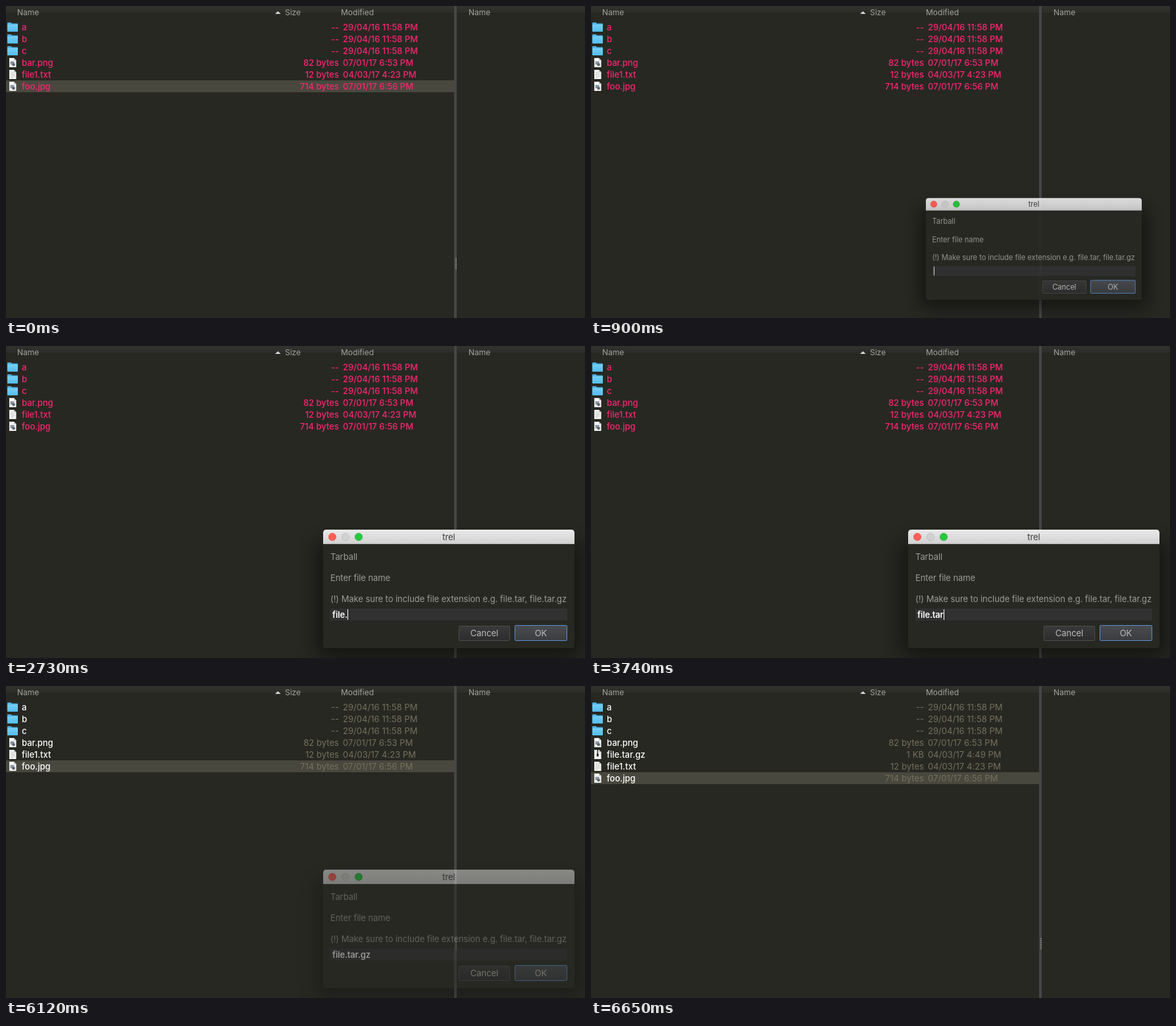
Recreate the animation shown at these times as an HTML page. Size 880 by 474 pixels, loop 8420 ms.

```html
<!DOCTYPE html>
<html lang="en">
<head>
<meta charset="utf-8">
<title>File list</title>
<style>
  html, body { margin: 0; width: 100%; height: 100%; overflow: hidden; background: #272822; }
  svg { display: block; width: 880px; height: 474px; }
  text { font: 400 13px Inter, "Open Sans", sans-serif; letter-spacing: -.06px; white-space: pre; }
  .head { font-size: 12px; letter-spacing: 0; fill: #a3a39d; }
  #rows text { font-weight: 500; letter-spacing: 0; }
  #rows .name { fill: #fff; }
  #rows .info { fill: #75715e; font-weight: 400; letter-spacing: .05px; }
  #rows.marked .name, #rows.marked .info { fill: #f92672; font-weight: 500; letter-spacing: 0; }
  .end { text-anchor: end; }
  .mid { text-anchor: middle; }
  .label { fill: #9c9c96; }
  #typed { fill: #fff; font-weight: 600; letter-spacing: -.18px; }
  #dialog { transform-origin: 673px 369px; }
  #shadow { filter: blur(15px); }
</style>
</head>
<body>
<svg viewBox="0 0 880 474">
  <defs>
    <linearGradient id="top" x2="0" y2="1">
      <stop offset="0" stop-color="#32332e"/><stop offset="1" stop-color="#2d2e29"/>
    </linearGradient>
    <linearGradient id="bar" x2="0" y2="1">
      <stop offset="0" stop-color="#e9e9e9"/><stop offset="1" stop-color="#d1d1d1"/>
    </linearGradient>
    <linearGradient id="btn" x2="0" y2="1">
      <stop offset="0" stop-color="#39393a"/><stop offset="1" stop-color="#2d2d2e"/>
    </linearGradient>
    <linearGradient id="okBtn" x2="0" y2="1">
      <stop offset="0" stop-color="#4a4c50"/><stop offset="1" stop-color="#3a3c40"/>
    </linearGradient>
    <linearGradient id="blue" x2="0" y2="1">
      <stop offset="0" stop-color="#74cff7"/><stop offset="1" stop-color="#56bcec"/>
    </linearGradient>
    <g id="folder">
      <path d="M2 3q0-1 1-1h4.5L9 3.5h8q1 0 1 1V15q0 1-1 1H3q-1 0-1-1z" fill="#52b2e2"/>
      <path d="M2 5h16v10q0 1-1 1H3q-1 0-1-1z" fill="url(#blue)"/>
    </g>
    <g id="page">
      <path d="M5 2h7l3.5 3.5V16H5z" fill="#f4f4f4"/>
      <path d="M12 2v3.5h3.5z" fill="#bdbdbd"/>
    </g>
    <g id="image">
      <use href="#page"/>
      <rect x="6.5" y="7" width="6" height="5" fill="#8b98a8"/>
      <circle cx="11.5" cy="12" r="2.3" fill="#5d6670"/>
    </g>
    <g id="doc">
      <use href="#page"/>
      <path d="M6.5 5.5h5M6.5 7.5h7M6.5 9.5h7M6.5 11.5h7M6.5 13.5h5" stroke="#c4c4c4" stroke-width=".8"/>
    </g>
    <g id="zip">
      <use href="#page"/>
      <path d="M10 2v7" stroke="#222" stroke-width="2" stroke-dasharray="1.5 .7"/>
      <rect x="8.7" y="8" width="2.8" height="4" fill="#222"/>
    </g>
  </defs>

  <rect width="880" height="474" fill="#272822"/>
  <rect width="880" height="10" fill="url(#top)"/>
  <text class="head" x="17" y="14">Name</text>
  <path d="M409 12l4.3-4 4.3 4z" fill="#d8d8d8"/>
  <text class="head" x="424" y="14">Size</text>
  <text class="head" x="509" y="14">Modified</text>
  <text class="head" x="703" y="14">Name</text>

  <rect id="cursor" width="681" height="18" fill="#49483e"/>
  <g id="rows"></g>

  <rect x="681" width="4" height="474" fill="#464648"/>
  <path d="M684 383.5v17" stroke="#b8b8b8" stroke-width="2" stroke-dasharray="1 2"/>

  <g id="dialog">
    <rect id="shadow" x="472" y="296" width="402" height="178" rx="8" fill="#000" opacity=".48"/>
    <path d="M482 301h382v154q0 4-4 4H486q-4 0-4-4z" fill="#272822"/>
    <path d="M482 301v-17q0-5 5-5h372q5 0 5 5v17z" fill="url(#bar)"/>
    <path d="M482 300.5h382" stroke="#b4b4b4"/>
    <g stroke-width=".8">
      <circle cx="496" cy="290" r="5.6" fill="#ff5f57" stroke="#e9544c"/>
      <circle cx="516" cy="290" r="5.6" fill="#d1d1d1" stroke="#bcbcbc"/>
      <circle cx="536" cy="290" r="5.6" fill="#28c840" stroke="#24b339"/>
    </g>
    <text class="mid" x="673" y="295" fill="#3c3c3c">trel</text>
    <text class="label" x="493" y="325">Tarball</text>
    <text class="label" x="493" y="357">Enter file name</text>
    <text class="label" x="493" y="389">(!) Make sure to include file extension e.g. file.tar, file.tar.gz</text>
    <rect x="493" y="399" width="360" height="18" fill="#313132"/>
    <text id="typed" x="496" y="413"></text>
    <rect id="caret" y="400" width="1" height="16" fill="#fff"/>
    <rect x="688.5" y="425.5" width="77" height="22" rx="1" fill="url(#btn)" stroke="#4c4c4d"/>
    <text class="mid" x="727" y="441" fill="#bcbcb8">Cancel</text>
    <rect x="773.5" y="424.5" width="79" height="23" rx="1" fill="url(#okBtn)" stroke="#5a91d4"/>
    <text class="mid" x="813" y="441" fill="#bcbcb8">OK</text>
  </g>
</svg>
<script>
const LOOP = 8420, SWAP = 6120, ADDED = 6650;
const NAME = 'file.tar.gz';
const $ = id => document.getElementById(id);

const files = [
  ['folder', 'a', '--', '29/04/16 11:58 PM'],
  ['folder', 'b', '--', '29/04/16 11:58 PM'],
  ['folder', 'c', '--', '29/04/16 11:58 PM'],
  ['image', 'bar.png', '82 bytes', '07/01/17 6:53 PM'],
  ['zip', NAME, '1 KB', '04/03/17 4:49 PM'],
  ['doc', 'file1.txt', '12 bytes', '04/03/17 4:23 PM'],
  ['image', 'foo.jpg', '714 bytes', '07/01/17 6:56 PM']
];
$('rows').innerHTML = files.map(([icon, name, size, date]) => `<g>
  <use href="#${icon}"/>
  <text class="name" x="24" y="14">${name}</text>
  <text class="info end" x="506" y="14">${size}</text>
  <text class="info" x="512" y="14">${date}</text></g>`).join('');
const rows = [...$('rows').children];

// [time, typed letters, caret shown]
const typing = [
  [0, 0, 1], [1230, 0, 0], [1710, 0, 1], [2190, 1, 1], [2310, 2, 1], [2490, 3, 1],
  [2670, 4, 1], [2730, 5, 1], [3210, 5, 0], [3570, 6, 1], [3650, 7, 1], [3740, 8, 1],
  [4220, 8, 0], [4400, 9, 1], [4810, 10, 1], [5110, 11, 1], [5650, 11, 0]
];
// [time, scale, opacity]
const popup = [[0, 1, 0], [900, .859, .93], [960, 1, 1], [SWAP, 1, .5], [6180, 1, 0]];

const at = (steps, t) => steps.filter(s => s[0] <= t).pop();
const show = (el, on) => el.setAttribute('visibility', on ? 'visible' : 'hidden');

function draw(t) {
  const added = t >= ADDED;
  rows.forEach((row, i) => {
    const place = i > 4 && !added ? i - 1 : i;
    row.setAttribute('transform', `translate(0 ${23 + 18 * place})`);
    show(row, i !== 4 || added);
  });
  $('rows').classList.toggle('marked', t < SWAP);
  $('cursor').setAttribute('y', added ? 131 : 113);
  show($('cursor'), t < 780 || t >= SWAP);

  const [, scale, opacity] = at(popup, t);
  $('dialog').style.transform = `scale(${scale})`;
  $('dialog').style.opacity = opacity;

  const [, count, caret] = at(typing, t);
  const typed = $('typed');
  typed.textContent = NAME.slice(0, count);
  const width = count ? typed.getComputedTextLength() : 0;
  $('caret').setAttribute('x', Math.round(496 + width));
  $('caret').setAttribute('opacity', caret);
}

const start = performance.now();
function tick() {
  draw((performance.now() - start) % LOOP);
  requestAnimationFrame(tick);
}
tick();
</script>
</body>
</html>
```
